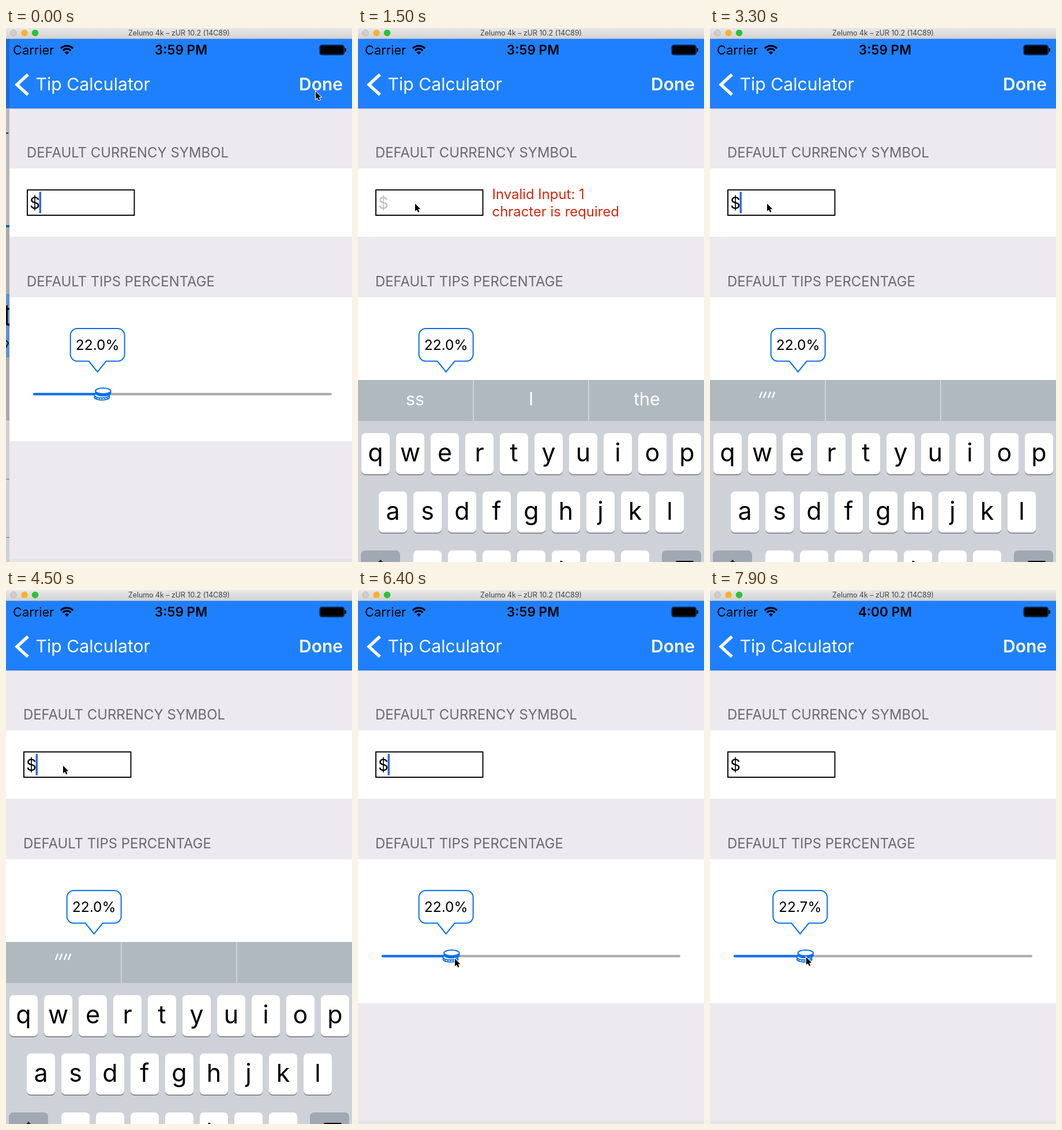
These frames come from a looping animation (600x924 px, 8 s). An HTML page with a canvas:

```html
<!DOCTYPE html>
<html lang="en">
<head>
<meta charset="utf-8">
<title>Tip settings</title>
<style>
html, body { margin: 0; width: 100%; height: 100%; overflow: hidden; background: #eceaf0; }
canvas { display: block; }
</style>
</head>
<body>
<canvas id="stage" width="600" height="924"></canvas>
<script>
const ctx = document.getElementById('stage').getContext('2d');
const LOOP = 8000, STEP = 100;
const BLUE = '#1e80ff', LINE = '#0a6fe8', PAGE = '#eceaf0', GREY = '#6a6a6f';

// Key poses: time, then values
const pointerPath = [[0, 537, 110], [100, 537, 110], [600, 98, 308], [1000, 98, 308],
  [1300, 99, 304], [5200, 99, 304], [5900, 168, 638], [6400, 168, 638]];
const tipPath = [[6500, 22], [7000, 81], [7200, 88], [7400, 84], [7900, 22.7]];
const keyboardPath = [[100, 315], [500, 0], [4500, 0], [4700, 315]];

const clamp = v => Math.max(0, Math.min(1, v));
const ramp = (t, a, b) => clamp((t - a) / (b - a));
const smooth = u => u * u * (3 - 2 * u);

function pose(path, t) {
  let i = 0;
  while (i < path.length - 2 && t >= path[i + 1][0]) i++;
  const a = path[i], b = path[i + 1];
  const u = smooth(ramp(t, a[0], b[0]));
  return a.slice(1).map((v, k) => v + (b[k + 1] - v) * u);
}

function rect(x, y, w, h, color) {
  ctx.fillStyle = color;
  ctx.fillRect(x, y, w, h);
}

function round(x, y, w, h, r, color) {
  ctx.fillStyle = color;
  ctx.beginPath();
  ctx.roundRect(x, y, w, h, r);
  ctx.fill();
}

function text(str, x, y, size, color, align = 'left', weight = 400) {
  ctx.font = `${weight} ${size}px Inter, Roboto, sans-serif`;
  ctx.fillStyle = color;
  ctx.textAlign = align;
  ctx.fillText(str, x, y);
}

function stroke(points, color, width, cap = 'butt') {
  ctx.beginPath();
  points.forEach(([x, y]) => ctx.lineTo(x, y));
  ctx.strokeStyle = color;
  ctx.lineWidth = width;
  ctx.lineCap = cap;
  ctx.stroke();
}

function ellipse(x, y, rx, ry, fill, line, width = 2) {
  ctx.beginPath();
  ctx.ellipse(x, y, rx, ry, 0, 0, 7);
  ctx.fillStyle = fill;
  ctx.fill();
  if (!line) return;
  ctx.strokeStyle = line;
  ctx.lineWidth = width;
  ctx.stroke();
}

function titleBar() {
  const g = ctx.createLinearGradient(0, 0, 0, 18);
  g.addColorStop(0, '#e9e8e9');
  g.addColorStop(1, '#d3d2d3');
  rect(0, 0, 600, 18, g);
  rect(0, 18, 600, 1, '#a9b4c4');
  ellipse(13, 8.5, 5.3, 5.3, '#cfcdcf', '#bbb9bb', 1);
  ellipse(32, 8.5, 5.8, 5.8, '#f6b42f');
  ellipse(50.5, 8.5, 5.8, 5.8, '#2cc13b');
  text('Zelumo 4k – zUR 10.2 (14C89)', 300, 13, 12.4, '#444', 'center');
}

function wifi() {
  for (const [r, w] of [[15.2, 3.2], [9.8, 3.2], [2.8, 5.6]]) {
    ctx.beginPath();
    ctx.arc(105.5, 46, r, -Math.PI * .75, -Math.PI * .25);
    ctx.strokeStyle = '#000';
    ctx.lineWidth = w;
    ctx.lineCap = 'butt';
    ctx.stroke();
  }
}

function navBar(t) {
  rect(0, 19, 600, 120, BLUE);
  rect(0, 139, 600, 1, '#b4b6c2');
  text('Carrier', 12, 46, 21.8, '#000');
  wifi();
  text(t < 7500 ? '3:59 PM' : '4:00 PM', 303.5, 46, 22.7, '#000', 'center', 600);
  ctx.strokeStyle = '#000';
  ctx.lineWidth = 1;
  ctx.beginPath();
  ctx.roundRect(544, 29.5, 42.5, 17, 3.5);
  ctx.stroke();
  round(545, 30.5, 40.5, 15, 2.5, '#000');
  round(587.5, 35, 2.5, 6, 1, '#000');
  stroke([[38, 80.5], [19, 98], [38, 115.5]], '#fff', 5.4);
  text('Tip Calculator', 51.5, 108, 30.2, '#fff');
  text('Done', 584, 108, 30, '#fff', 'right', 600);
}

// Edge of the previous screen that is being covered
function previousScreen() {
  rect(0, 19, 6, 120, '#1a6dd8');
  rect(0, 139, 6, 541, '#b9b8bb');
  rect(0, 341, 6, 4, '#175fc0');
  rect(0, 345, 6, 115, '#aaa9ac');
  rect(0, 460, 6, 110, '#5f92d3');
  rect(0, 570, 6, 109, '#a9a8ab');
  rect(0, 679, 6, 245, '#d0cfd1');
  rect(0, 780, 6, 1, '#777');
  rect(0, 881, 6, 1, '#777');
  stroke([[0, 182], [4, 182]], '#222', 2);
  stroke([[0, 486], [6, 486]], '#000', 3);
  stroke([[1, 480], [1, 512], [6, 514]], '#000', 4);
  stroke([[0, 540], [4, 545], [0, 553]], '#111', 2);
}

function caretAlpha(t, empty) {
  const shift = t < 1200 ? 170 : empty ? 500 : 0;
  const p = (t + shift) % 1000;
  return ramp(p, 50, 150) * (1 - ramp(p, 700, 900));
}

function field(t, empty) {
  ctx.strokeStyle = '#000';
  ctx.lineWidth = 1.9;
  ctx.strokeRect(31, 280.2, 185.5, 43.8);
  text('$', 35, 312.5, 28, empty ? '#c0c0c5' : '#000');
  ctx.globalAlpha = caretAlpha(t, empty);
  rect(empty ? 33.5 : 51.5, 283.5, 3.5, 37, '#2f66e6');
  ctx.globalAlpha = 1;
  if (!empty) return;
  text('Invalid Input: 1', 232.5, 296, 23.9, '#d4260c');
  text('chracter is required', 232.5, 325.5, 23.9, '#d4260c');
}

function bubble(value) {
  const x = 38.7 + 5.18 * value, l = x - 47, r = x + 47, top = 520, low = 576.5, c = 12;
  ctx.beginPath();
  ctx.moveTo(x, 595);
  ctx.lineTo(x - 15, low);
  ctx.arcTo(l, low, l, top, c);
  ctx.arcTo(l, top, r, top, c);
  ctx.arcTo(r, top, r, low, c);
  ctx.arcTo(r, low, x, low, c);
  ctx.lineTo(x + 15, low);
  ctx.closePath();
  ctx.fillStyle = '#fff';
  ctx.fill();
  ctx.strokeStyle = LINE;
  ctx.lineWidth = 2;
  ctx.stroke();
  text(value.toFixed(1) + '%', x, 557, 24.5, '#000', 'center');
}

function slider(value) {
  const x = 54 + 4.88 * value;
  stroke([[43, 633.5], [557, 633.5]], '#a9a9ab', 4, 'round');
  stroke([[43, 633.5], [x, 633.5]], '#0a70f2', 4, 'round');
  ellipse(x - 1, 639, 13, 4.8, '#fff', LINE);
  ellipse(x - 1, 635.5, 13, 4.8, '#fff', LINE);
  for (let i = -9; i <= 9; i += 4.5)
    stroke([[x - 1 + i, 639.5], [x - 1 + i, 642.5]], LINE, 1.4);
  ellipse(x + 1, 631.5, 13.3, 5, LINE, LINE);
  ellipse(x + 1, 628, 13.3, 5, '#fff', LINE);
}

function settings(t, empty, tip) {
  rect(0, 139, 600, 785, PAGE);
  rect(0, 918, 600, 6, '#e5e4e8');
  rect(0, 243, 600, 118, '#fff');
  rect(0, 466, 600, 249, '#fff');
  text('DEFAULT CURRENCY SYMBOL', 30, 224, 23.9, GREY);
  text('DEFAULT TIPS PERCENTAGE', 30, 447, 23.9, GREY);
  field(t, empty);
  slider(tip);
  bubble(tip);
}

function key(letter, x, y) {
  round(x, y + 2, 49, 71, 7, '#8b8e93');
  round(x, y, 49, 71, 7, '#fff');
  text(letter, x + 24.5, y + 49, 43, '#000', 'center');
}

function keyboard(empty) {
  rect(0, 609, 600, 315, '#ced2d8');
  rect(0, 609, 600, 71, '#b1b9c0');
  rect(199, 609, 2, 71, '#cbd1d6');
  rect(399, 609, 2, 71, '#cbd1d6');
  if (empty) {
    ['ss', 'I', 'the'].forEach((w, i) => text(w, 99 + i * 201, 653, 30.5, '#fff', 'center'));
  } else {
    for (const x of [86, 93, 101, 108]) stroke([[x, 640], [x + 4, 629.5]], '#fff', 2.4);
  }
  [['qwertyuiop', 6, 701], ['asdfghjkl', 36, 802], ['zxcvbnm', 96, 904]].forEach(([row, x, y]) =>
    [...row].forEach((c, i) => key(c, x + 60 * i, y)));
  round(5, 904, 68, 71, 7, '#a0a8b3');
  round(527, 904, 68, 71, 7, '#a0a8b3');
  stroke([[22, 939], [39, 922], [56, 939]], '#222', 3);
  stroke([[540, 936], [553, 923.5], [580, 923.5], [580, 936]], '#000', 3);
}

function pointer([x, y]) {
  ctx.save();
  ctx.translate(x, y);
  ctx.beginPath();
  [[0, 0], [0, 13], [3, 10.4], [5.2, 15], [7.5, 14], [5.4, 9.6], [9.3, 9.3]]
    .forEach(p => ctx.lineTo(...p));
  ctx.closePath();
  ctx.strokeStyle = '#fff';
  ctx.lineWidth = 2;
  ctx.stroke();
  ctx.fillStyle = '#000';
  ctx.fill();
  ctx.restore();
}

function draw(t) {
  const empty = t >= 1300 && t < 3200;
  const [tip] = pose(tipPath, t);
  const [drop] = pose(keyboardPath, t);
  const mouse = pose(pointerPath, t);
  if (t >= 6500) {
    const held = ramp(t, 6500, 7900);
    mouse[0] = 54 + 4.88 * tip + 7 - 5 * held;
    mouse[1] = 638 - 2.5 * held;
  }

  ctx.save();
  if (t < STEP) ctx.translate(6, 0);
  settings(t, empty, tip);
  ctx.restore();
  navBar(t);
  if (t < STEP) previousScreen();

  ctx.globalAlpha = ramp(t, 100, 300) * (1 - ramp(t, 1000, 1300));
  round(589.5, 144, 5, 394, 2.5, '#8f8d93');
  ctx.globalAlpha = 1;

  if (drop < 315) {
    ctx.save();
    ctx.translate(0, drop);
    keyboard(empty);
    ctx.restore();
  }
  titleBar();
  pointer(mouse);
}

const start = performance.now();
function tick() {
  const t = (performance.now() - start) % LOOP;
  draw(Math.floor(t / STEP) * STEP);
  requestAnimationFrame(tick);
}
tick();
</script>
</body>
</html>
```
